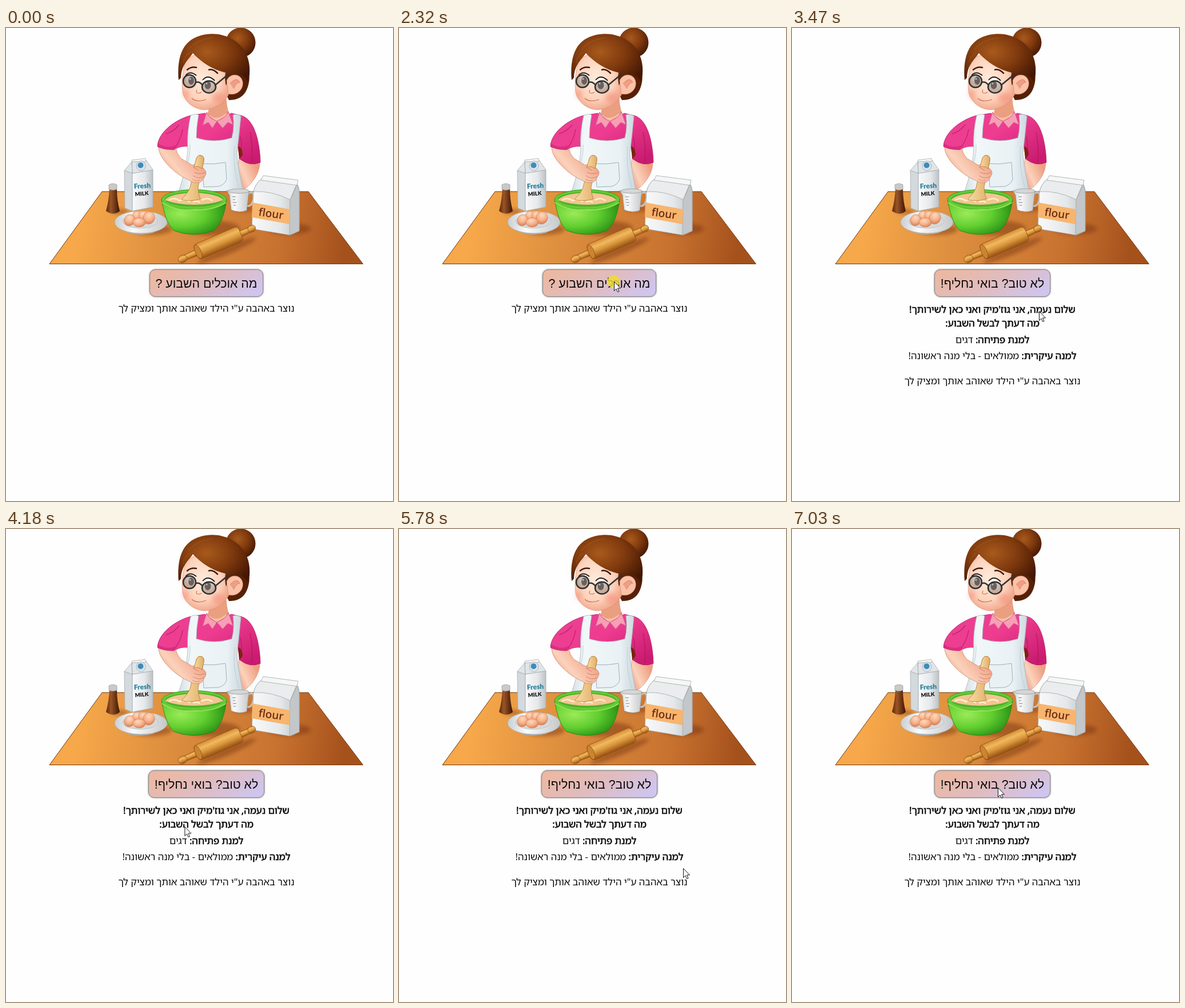
Animation of 677 by 827 pixels, one loop 8 s. Source, as an HTML page:

```html
<!DOCTYPE html>
<html lang="he">
<head>
<meta charset="utf-8">
<title>מה אוכלים השבוע</title>
<style>
html, body { margin: 0; width: 100%; height: 100%; overflow: hidden; background: #fefefe; }
svg { display: block; width: 677px; height: 827px; }
.he text { font: 16.8px "Open Sans", "Noto Sans Hebrew", "Noto Sans", sans-serif; direction: rtl; text-anchor: middle; fill: #0b0b0b; }
.he .btn { font: 21.3px "Liberation Sans", Arial, sans-serif; }
.b { stroke: #0b0b0b; stroke-width: .65px; }
.box { fill: url(#button); stroke: #8c8584; stroke-width: 1px; filter: drop-shadow(0 0 1.5px #777); }
.ask, .menu, .tap, .seen, .cursor { animation: 8s step-end infinite; }
.ask { animation-name: ask; }
.menu { animation-name: menu; }
.tap { animation-name: tap; }
.seen { animation-name: seen; }
.cursor { animation-name: move; }
@keyframes ask { 0% { opacity: 1 } 29.8%, 100% { opacity: 0 } }
@keyframes menu { 0% { opacity: 0 } 29.8%, 100% { opacity: 1 } }
@keyframes tap { 0% { opacity: 0 } 28.95% { opacity: 1 } 29.8%, 100% { opacity: 0 } }
@keyframes seen { 0% { opacity: 0 } 10.6%, 100% { opacity: 1 } }
@keyframes move {
  0% { transform: translate(597px, 765px) }
  10.6% { transform: translate(597px, 765px); animation-timing-function: steps(3) }
  13.25% { transform: translate(523px, 698px); animation-timing-function: steps(4) }
  16.8% { transform: translate(432px, 528px); animation-timing-function: steps(4) }
  20.35% { transform: translate(383px, 443px); animation-timing-function: steps(2) }
  22.1%, 35.6% { transform: translate(376px, 443px); animation-timing-function: steps(4) }
  39.1% { transform: translate(324px, 466px); animation-timing-function: steps(5) }
  43.3% { transform: translate(432px, 495px); animation-timing-function: steps(3) }
  46.1% { transform: translate(481px, 494px); animation-timing-function: steps(2) }
  47.85% { transform: translate(529px, 506px); animation-timing-function: steps(6) }
  53.1% { transform: translate(269px, 523px); animation-timing-function: steps(4) }
  56.6% { transform: translate(440px, 556px); animation-timing-function: steps(2) }
  58.35% { transform: translate(465px, 540px); animation-timing-function: steps(3) }
  60.9% { transform: translate(416px, 549px); animation-timing-function: steps(7) }
  67.1%, 67.85% { transform: translate(282px, 559px); animation-timing-function: steps(5) }
  72.15% { transform: translate(497px, 593px); animation-timing-function: steps(3) }
  74.85%, 76.7% { transform: translate(381px, 575px); animation-timing-function: steps(6) }
  82% { transform: translate(356px, 495px); animation-timing-function: steps(5) }
  86.95% { transform: translate(359px, 452px) }
  87.8%, 100% { transform: translate(360px, 452px) }
}
</style>
</head>
<body>
<svg viewBox="0 0 677 827" xmlns="http://www.w3.org/2000/svg">
<defs>
  <linearGradient id="button" x1="0" y1=".3" x2="1" y2=".7"><stop stop-color="#ecb8a2"/><stop offset=".5" stop-color="#e0bcbf"/><stop offset="1" stop-color="#cfc5ef"/></linearGradient>
  <linearGradient id="wood" gradientUnits="userSpaceOnUse" x1="130" y1="330" x2="590" y2="400"><stop stop-color="#f6a84a"/><stop offset=".4" stop-color="#d98a3c"/><stop offset=".75" stop-color="#c87230"/><stop offset="1" stop-color="#a5511c"/></linearGradient>
  <radialGradient id="hair" cx=".4" cy=".35" r=".7"><stop stop-color="#a85a1c"/><stop offset=".5" stop-color="#803a0e"/><stop offset="1" stop-color="#431703"/></radialGradient>
  <radialGradient id="face" cx=".42" cy=".45" r=".62"><stop stop-color="#ffeadb"/><stop offset=".6" stop-color="#fdd3bc"/><stop offset="1" stop-color="#ee9c80"/></radialGradient>
  <linearGradient id="arm" x1="0" y1=".7" x2=".8" y2=".2"><stop stop-color="#ee987c"/><stop offset=".4" stop-color="#fbd2bc"/><stop offset="1" stop-color="#ef9f82"/></linearGradient>
  <linearGradient id="shirt" x1="0" y1="0" x2="1" y2=".8"><stop stop-color="#ea4292"/><stop offset=".5" stop-color="#ee3c90"/><stop offset="1" stop-color="#c91c70"/></linearGradient>
  <linearGradient id="apron"><stop stop-color="#d5e0e5"/><stop offset=".2" stop-color="#f1f7f9"/><stop offset=".75" stop-color="#e9f1f4"/><stop offset="1" stop-color="#c9d6dc"/></linearGradient>
  <radialGradient id="bowl" cx=".3" cy=".4" r=".75"><stop stop-color="#9bea58"/><stop offset=".5" stop-color="#62cf30"/><stop offset="1" stop-color="#238a12"/></radialGradient>
  <linearGradient id="white"><stop stop-color="#c9ced2"/><stop offset=".35" stop-color="#fafafa"/><stop offset="1" stop-color="#c5c8ca"/></linearGradient>
  <linearGradient id="pale"><stop stop-color="#f8f9fa"/><stop offset=".6" stop-color="#e5e8ea"/><stop offset="1" stop-color="#bcc1c4"/></linearGradient>
  <linearGradient id="bottle"><stop stop-color="#5a2607"/><stop offset=".35" stop-color="#9a5527"/><stop offset="1" stop-color="#3d1502"/></linearGradient>
  <linearGradient id="pin" x2="0" y2="1"><stop stop-color="#d48c31"/><stop offset=".3" stop-color="#f0b960"/><stop offset=".6" stop-color="#d8933a"/><stop offset="1" stop-color="#945011"/></linearGradient>
  <radialGradient id="egg" cx=".4" cy=".3" r=".7"><stop stop-color="#ffd9bd"/><stop offset=".6" stop-color="#f6b18a"/><stop offset="1" stop-color="#d98058"/></radialGradient>
  <linearGradient id="stick"><stop stop-color="#f9dca5"/><stop offset="1" stop-color="#dfae68"/></linearGradient>
  <filter id="soft"><feGaussianBlur stdDeviation="3"/></filter>
  <filter id="blush"><feGaussianBlur stdDeviation="4"/></filter>
</defs>

<!-- cook -->
<g stroke-linejoin="round">
  <circle cx="410.500" cy="25.500" r="26" fill="url(#hair)"/>
  <path d="M385 60C424 62 432 82 421 108Q413 126 390 126L374 95Z" fill="#562006"/>
  <path d="M354 130Q357 150 346 158L368 178L396 160Q387 150 385 118Z" fill="#e99f80"/>
  <path d="M356 152Q369 163 385 149L388 156L368 172L349 157Z" fill="#f7bfa3"/>
  <path d="M408 226L444 236C443 257 428 276 412 285L403 265Z" fill="url(#arm)" stroke="#c87b60" stroke-width=".6"/>
  <path d="M323 153L348 149L368 164L394 149L411 153C435 159 444 200 445 235Q427 243 409 229L405 202H331L318 207Q306 206 297 211Q278 211 265 207C266 181 299 159 323 153Z" fill="url(#shirt)" stroke="#b51661" stroke-width=".8"/>
  <path d="M410 190Q414 207 411 226M280 185Q294 181 303 169M309 177Q306 195 295 210M427 182Q432 205 430 235" fill="none" stroke="#b2115c" stroke-width="1.5" opacity=".6"/>
  <path d="M406 207Q413 208 414 222L408 229Z" fill="#7d240f"/>
  <path d="M323 153Q331 149 337 152Q333 174 333 192Q364 202 395 192Q400 173 397 152Q404 149 411 154Q408 186 404 219Q405 239 415 286H302Q316 245 318 213Q316 183 323 153Z" fill="url(#apron)" stroke="#a5b4bc" stroke-width=".8"/>
  <path d="M343 237Q364 239 384 235L386 264Q383 274 372 277L346 278Z" fill="#e9f1f4" stroke="#9fafb6"/>
  <path d="M322 204Q323 225 313 249M400 206Q396 242 407 278" fill="none" stroke="#b9c7ce" opacity=".8"/>
  <path d="M351 147L344 170L354 165L361 175L369 163Q355 158 351 147ZM389 146Q386 156 369 163L379 175L388 165L397 169Z" fill="#f79fb6" stroke="#db5e8c"/>

  <path d="M315 55C308 77 307 96 309 112C313 132 332 143 348 143C372 141 389 125 394 104L392 62L340 41Z" fill="url(#face)" stroke="#d98c70" stroke-width=".6"/>
  <g fill="#f58571" filter="url(#blush)" opacity=".5"><ellipse cx="315" cy="115" rx="5" ry="8"/><ellipse cx="371" cy="121" rx="11" ry="8"/></g>
  <path d="M302 91C299 53 307 22 341 13C372 4 408 18 420 45Q430 66 424 95Q413 75 397 81Q388 87 385 101Q382 89 384 78C362 73 343 61 327 44C318 57 307 64 306 87Z" fill="url(#hair)"/>
  <path d="M319 38Q333 20 362 17M310 61Q311 51 321 42" fill="none" stroke="#b5702d" stroke-width="1.3" opacity=".3"/>
  <path d="M386 92C392 78 411 79 414 94C416 108 403 119 389 115Z" fill="#fac3a9" stroke="#d88d73" stroke-width=".7"/>
  <path d="M392 97Q404 84 409 95Q404 94 398 106" fill="#ef9e83" stroke="#ce745d" stroke-width=".7"/>
  <path d="M317 73Q324 67 333 69M355 73Q362 71 370 79" fill="none" stroke="#41190a" stroke-width="2.500" stroke-linecap="round"/>
  <g fill="#fff"><ellipse cx="324" cy="88" rx="9" ry="10"/><ellipse cx="354" cy="96" rx="10" ry="11"/></g>
  <g fill="#4c403c"><ellipse cx="324" cy="92" rx="5" ry="7"/><ellipse cx="353" cy="100" rx="5.500" ry="7"/></g>
  <g fill="#fff"><circle cx="322" cy="89" r="1.500"/><circle cx="351" cy="97" r="1.500"/></g>
  <path d="M314 83Q322 74 333 83M344 91Q353 80 365 92" fill="none" stroke="#251712" stroke-width="1.800"/>
  <g fill="#8d7f78" fill-opacity=".5" stroke="#30302f" stroke-width="2.500"><ellipse cx="321" cy="93" rx="11" ry="11"/><ellipse cx="355" cy="103" rx="12" ry="10.500"/></g>
  <path d="M332 95Q338 93 343 99M367 99L390 80" fill="none" stroke="#333" stroke-width="2.500"/>
  <path d="M334 108Q331 114 337 114Q340 114 342 112M325 123Q334 131 350 125" fill="none" stroke="#c9694f" stroke-width="1.100"/>
</g>

<!-- table -->
<path d="M168 286H529L624.500 412.500H76Z" fill="url(#wood)" stroke="#713710"/>
<g fill="#6c2c08" opacity=".42" filter="url(#soft)">
  <ellipse cx="361" cy="350" rx="48" ry="13"/><ellipse cx="254" cy="352" rx="36" ry="10"/><ellipse cx="495" cy="351" rx="38" ry="10"/>
  <ellipse cx="416" cy="316" rx="20" ry="5"/><ellipse cx="386" cy="389" rx="55" ry="7" transform="rotate(-23 386 389)"/><ellipse cx="198" cy="321" rx="15" ry="4"/>
</g>

<!-- bottle, milk -->
<path d="M181 281L194 281Q194 301 199 320Q188 329 175 320Q180 301 181 281Z" fill="url(#bottle)"/>
<path d="M180 274Q187 270 194 274V282Q187 285 180 282Z" fill="#c8c9c8" stroke="#979997" stroke-width=".7"/>
<g stroke="#a5abb0" stroke-width=".8" stroke-linejoin="round">
  <path d="M207 249L221 254V320L208 315Z" fill="#d4d9dd"/>
  <path d="M221 254L257 248V313L221 320Z" fill="url(#pale)"/>
  <path d="M207 249L220 234L221 254ZM220 234L245 231L257 248L221 254Z" fill="#e0e5e8"/>
  <path d="M220 234V231L244 228L245 233Z" fill="#f6f7f7"/>
  <ellipse cx="236" cy="241" rx="8" ry="8.500" fill="#dce5eb"/>
</g>
<circle cx="235.500" cy="240" r="5" fill="#3e8cba"/>
<g font-family="Lato, sans-serif" font-weight="900">
  <text x="224" y="281" font-size="12" fill="#257f9d" transform="rotate(-3 224 281)">Fresh</text>
  <text x="226" y="294" font-size="9.500" fill="#111" transform="rotate(-5 226 294)">MILK</text>
</g>

<!-- plate of eggs -->
<path d="M207 352L215 359Q237 364 258 358L267 350Z" fill="#a9adae"/>
<ellipse cx="236" cy="339.500" rx="46" ry="19.500" fill="url(#white)" stroke="#aaa" stroke-width=".8"/>
<ellipse cx="235" cy="338" rx="31" ry="12" fill="#d6d9da" stroke="#c2c6c8"/>
<g fill="url(#egg)" stroke="#cf7d55" stroke-width=".6">
  <ellipse cx="230" cy="328" rx="9" ry="8"/><ellipse cx="241" cy="328" rx="9" ry="8"/><ellipse cx="216" cy="336" rx="9" ry="10" transform="rotate(25 216 336)"/>
  <ellipse cx="250" cy="332" rx="10" ry="11" transform="rotate(25 250 332)"/><ellipse cx="233" cy="340" rx="11" ry="8"/>
</g>

<!-- cup, flour -->
<path d="M423 290Q434 282 433 297Q431 313 421 311" fill="none" stroke="#c3c5c5" stroke-width="3"/>
<path d="M386 284L425 285L421 319Q408 324 394 318L391 292Z" fill="url(#white)" stroke="#989a9b" stroke-width=".8"/>
<ellipse cx="407" cy="285" rx="18" ry="4" fill="#d5d7d7" stroke="#a4a6a6"/>
<path d="M396 295h6M397 300h4M397 305h6M398 310h4" stroke="#74797b"/>
<g stroke="#a2a6a8" stroke-width=".8" stroke-linejoin="round">
  <path d="M433 286Q436 272 447 264L509 272Q514 280 513 292V352Q512 357 496 362L430 351Z" fill="url(#pale)"/>
  <path d="M497 300Q505 286 509 273Q514 282 513 292V355L496 362Z" fill="#c3c7ca"/>
  <path d="M433 286Q436 272 447 264L509 272Q503 285 497 300Q464 284 433 286Z" fill="#eaeced"/>
  <path d="M450 258L511 266L509 275L446 266Z" fill="#f5f6f6"/>
</g>
<path d="M431 305L497 317L496 343L430 331Z" fill="#f7b56e"/>
<text x="441" y="328" font-family="Open Sans, sans-serif" font-size="19" font-weight="600" fill="#702e12" transform="rotate(8 441 328)">flour</text>

<!-- bowl, spoon and hand -->
<path d="M272 300C277 326 282 342 293 354Q328 368 364 354C377 341 382 326 386 300Z" fill="url(#bowl)" stroke="#24820f" stroke-width=".8"/>
<ellipse cx="329" cy="300" rx="57" ry="17.500" fill="#66ca36" stroke="#2e9516" stroke-width=".8"/>
<ellipse cx="329" cy="299.500" rx="51" ry="13" fill="#4bb326"/>
<path d="M278 301Q284 293 305 290Q328 286 353 290Q376 294 380 301Q357 309 329 309Q301 309 278 301Z" fill="#f2c592"/>
<path d="M285 301Q294 295 304 302Q313 297 322 304M342 301Q353 295 361 302M327 304q8-3 12 1" fill="none" stroke="#fff0cb" stroke-width="2.500"/>
<path d="M273 305Q296 320 329 318Q363 319 385 305" fill="none" stroke="#94e75a" stroke-width="2"/>
<path d="M333 228Q336 221 342 223Q347 225 346 232L336 278Q336 290 340 299Q324 304 307 300Q318 289 322 279Z" fill="url(#stick)" stroke="#b87936" stroke-width=".8"/>
<path d="M267 208Q282 215 297 211Q299 220 306 228L326 240Q334 235 345 245Q352 251 349 257L344 266Q340 272 328 270L316 264C298 256 267 230 267 208Z" fill="url(#arm)" stroke="#c87a5c" stroke-width=".7"/>
<path d="M333 228Q336 221 342 223Q347 225 346 232L343 246Q336 240 329 243Z" fill="url(#stick)" stroke="#b87936" stroke-width=".8"/>
<path d="M327 243L337 249M329 252Q337 257 348 253M327 258Q336 265 346 260M326 264Q332 269 339 266" fill="none" stroke="#c87858" stroke-width=".8"/>
<path d="M265 201Q280 212 297 205L295 213Q278 214 265 208Z" fill="#d72f80"/>

<!-- rolling pin -->
<g transform="translate(371 376) rotate(-23.200)" fill="url(#pin)" stroke="#8b4c12" stroke-width=".7">
  <path d="M-40-5L-65-4V5L-40 6ZM40-5L62-4V5L40 6Z"/>
  <ellipse cx="-68" cy="1" rx="8" ry="6.500"/><ellipse cx="64" cy="0" rx="7" ry="6"/>
  <rect x="-42" y="-14" width="85" height="28" rx="6"/>
  <ellipse cx="-38" cy="0" rx="5" ry="13" fill="#cc8430"/>
</g>

<!-- captions -->
<g class="he">
  <g class="ask">
    <rect class="box" x="251.500" y="422.500" width="198" height="47" rx="10"/>
    <text class="btn" x="350.500" y="454">מה אוכלים השבוע ?</text>
    <text x="350.500" y="496">נוצר באהבה ע"י הילד שאוהב אותך ומציק לך</text>
  </g>
  <g class="menu">
    <rect class="box" x="249.500" y="422.500" width="202" height="47" rx="10"/>
    <text class="btn" x="350.500" y="454">לא טוב? בואי נחליף!</text>
    <text class="b" x="350.500" y="498">שלום נעמה, אני גוז'מיק ואני כאן לשירותך!</text>
    <text class="b" x="350.500" y="522">מה דעתך לבשל השבוע:</text>
    <text x="350.500" y="551"><tspan class="b">למנת פתיחה:</tspan> דגים</text>
    <text x="350.500" y="578.500"><tspan class="b">למנה עיקרית:</tspan> ממולאים - בלי מנה ראשונה!</text>
    <text x="350.500" y="623">נוצר באהבה ע"י הילד שאוהב אותך ומציק לך</text>
  </g>
</g>

<circle class="tap" cx="375.500" cy="443" r="11" fill="#eedb35" fill-opacity=".85"/>
<g class="seen"><path class="cursor" d="M.5.5V16.500L4 13L6.500 18.500L9 17.500L6.500 12H11.500Z" fill="#fff" stroke="#111"/></g>
</svg>
</body>
</html>
```
